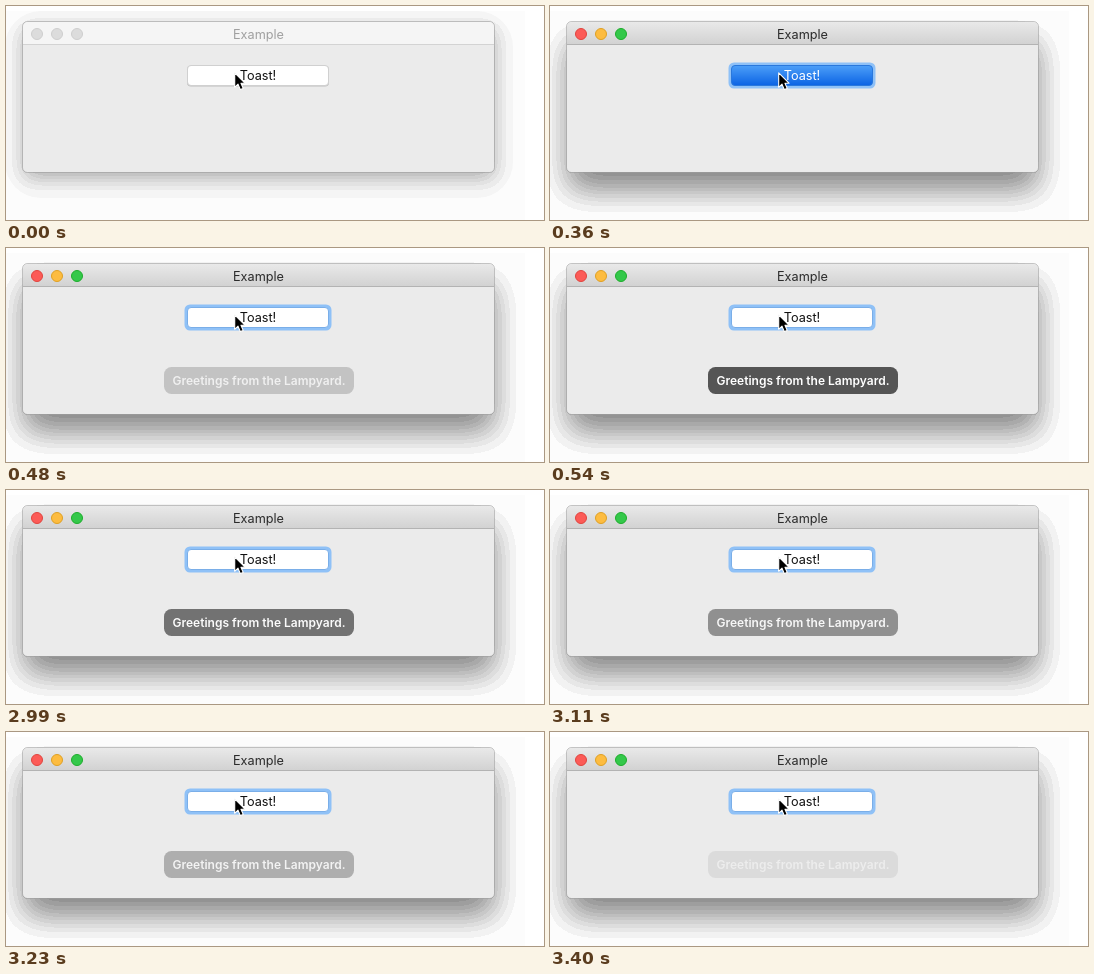
Write an HTML page that moves like this. It is 538 px wide and 214 px high and loops after 5440 ms.

```html
<!DOCTYPE html>
<html lang="en">
<head>
<meta charset="utf-8">
<title>Toast example</title>
<style>
  html, body { margin: 0; width: 100%; height: 100%; overflow: hidden; background: #fff; }
  svg { display: block; width: 538px; height: 214px; }
  text { font-family: Inter, Roboto, sans-serif; font-size: 12.7px; text-anchor: middle; }
  #toast text { font-size: 12px; font-weight: 600; fill: #fff; }
</style>
</head>
<body>
<svg viewBox="0 0 538 214">
  <defs>
    <linearGradient id="bar" x2="0" y2="1">
      <stop stop-color="#e9e9e9"/><stop offset="1" stop-color="#d1d1d1"/>
    </linearGradient>
    <linearGradient id="blue" x2="0" y2="1">
      <stop stop-color="#4d9ff8"/><stop offset="1" stop-color="#0b63e4"/>
    </linearGradient>
    <!-- Blurred shadows cut into flat bands -->
    <filter id="softShadow" filterUnits="userSpaceOnUse" x="-60" y="-60" width="660" height="340">
      <feOffset dy="7"/>
      <feGaussianBlur stdDeviation="10"/>
      <feComponentTransfer><feFuncA id="softBands" type="discrete"/></feComponentTransfer>
    </filter>
    <filter id="deepShadow" filterUnits="userSpaceOnUse" x="-60" y="-60" width="660" height="340">
      <feOffset dy="19"/>
      <feGaussianBlur stdDeviation="16"/>
      <feComponentTransfer><feFuncA id="deepBands" type="discrete"/></feComponentTransfer>
    </filter>
  </defs>

  <rect y="5" width="519" height="209" fill="#fcfcfc"/>

  <g id="idle">
    <rect x="-1" y="5" width="508" height="187" rx="36" fill="#f5f5f5"/>
    <rect x="17" y="16" width="472" height="150" rx="5" filter="url(#softShadow)"/>
  </g>
  <g id="active">
    <rect x="17" y="16" width="472" height="150" rx="5" filter="url(#deepShadow)"/>
  </g>

  <rect x="16.5" y="15.5" width="472" height="151" rx="5" fill="#ebebeb" stroke="#000" stroke-opacity=".2"/>
  <path id="titleBar" d="M17 39V21a5 5 0 0 1 5-5H483a5 5 0 0 1 5 5V39Z"/>
  <path id="titleLine" d="M17 38.5H488"/>
  <g id="lights">
    <circle cx="31" cy="28" r="5.5"/>
    <circle cx="51" cy="28" r="5.5"/>
    <circle cx="71" cy="28" r="5.5"/>
  </g>
  <text id="title" x="252.5" y="33">Example</text>

  <rect id="ring" x="178.5" y="56.5" width="147" height="26" rx="5.5" fill="#8fc1f7"/>
  <rect id="edge" x="181" y="59.5" width="142" height="21" rx="4" fill="#bdbdbd"/>
  <rect id="button" x="181.5" y="59.5" width="141" height="20" rx="3.5"/>
  <text id="label" x="252" y="74">Toast!</text>

  <g id="toast">
    <rect x="158" y="119" width="190" height="27" rx="7.5" fill="#555"/>
    <text x="253" y="137">Greetings from the Lampyard.</text>
  </g>

  <path d="M228.7 66.8V81.3L232 78.2L234.3 83.6L237.2 82.4L235 77.2H239Z"
        fill="#000" stroke="#fff" stroke-width="1.1" stroke-linejoin="round"/>
</svg>
<script>
  const LOOP = 5440, PRESS = 360, RELEASE = 480, SHOWN = 540, FADE = 2930, FADED = 3400;
  const LIGHTS = [["#fc5b57", "#e0443e"], ["#fdbc40", "#dfa023"], ["#34c84a", "#1dad2b"]];
  const $ = id => document.getElementById(id);
  const set = (el, attrs) => Object.entries(attrs).forEach(([k, v]) => el.setAttribute(k, v));
  const show = (id, on) => set($(id), { display: on ? "inline" : "none" });

  const bands = (n, max) =>
    Array.from({ length: n }, (_, i) => (i / n * max).toFixed(3)).join(" ");
  set($("softBands"), { tableValues: bands(8, 0.32) });
  set($("deepBands"), { tableValues: bands(12, 0.5) });

  function toastOpacity(t) {
    if (t < RELEASE) return 0;
    if (t < SHOWN) return 0.26;
    if (t < FADE) return 1;
    if (t >= FADED) return 0.1;
    return 0.9 - 0.1 * Math.floor((t - FADE) / 60);
  }

  function draw(t) {
    const active = t >= PRESS;
    const pressed = active && t < RELEASE;
    show("idle", !active);
    show("active", active);
    show("ring", active);
    show("edge", !active);
    set($("titleBar"), { fill: active ? "url(#bar)" : "#f5f5f5" });
    set($("titleLine"), { stroke: active ? "#b3b3b3" : "#d3d3d3" });
    set($("title"), { fill: active ? "#2b2b2b" : "#a0a0a0" });
    [...$("lights").children].forEach((dot, i) => {
      const [fill, stroke] = active ? LIGHTS[i] : ["#dcdcdc", "#cecece"];
      set(dot, { fill, stroke });
    });
    set($("button"), {
      fill: pressed ? "url(#blue)" : "#fff",
      stroke: pressed ? "#2a78dc" : active ? "#7aaee8" : "#d0d0d0"
    });
    set($("label"), { fill: pressed ? "#fff" : "#111" });
    set($("toast"), { opacity: toastOpacity(t) });
  }

  function tick() {
    draw(performance.now() % LOOP);
    requestAnimationFrame(tick);
  }
  tick();
</script>
</body>
</html>
```
